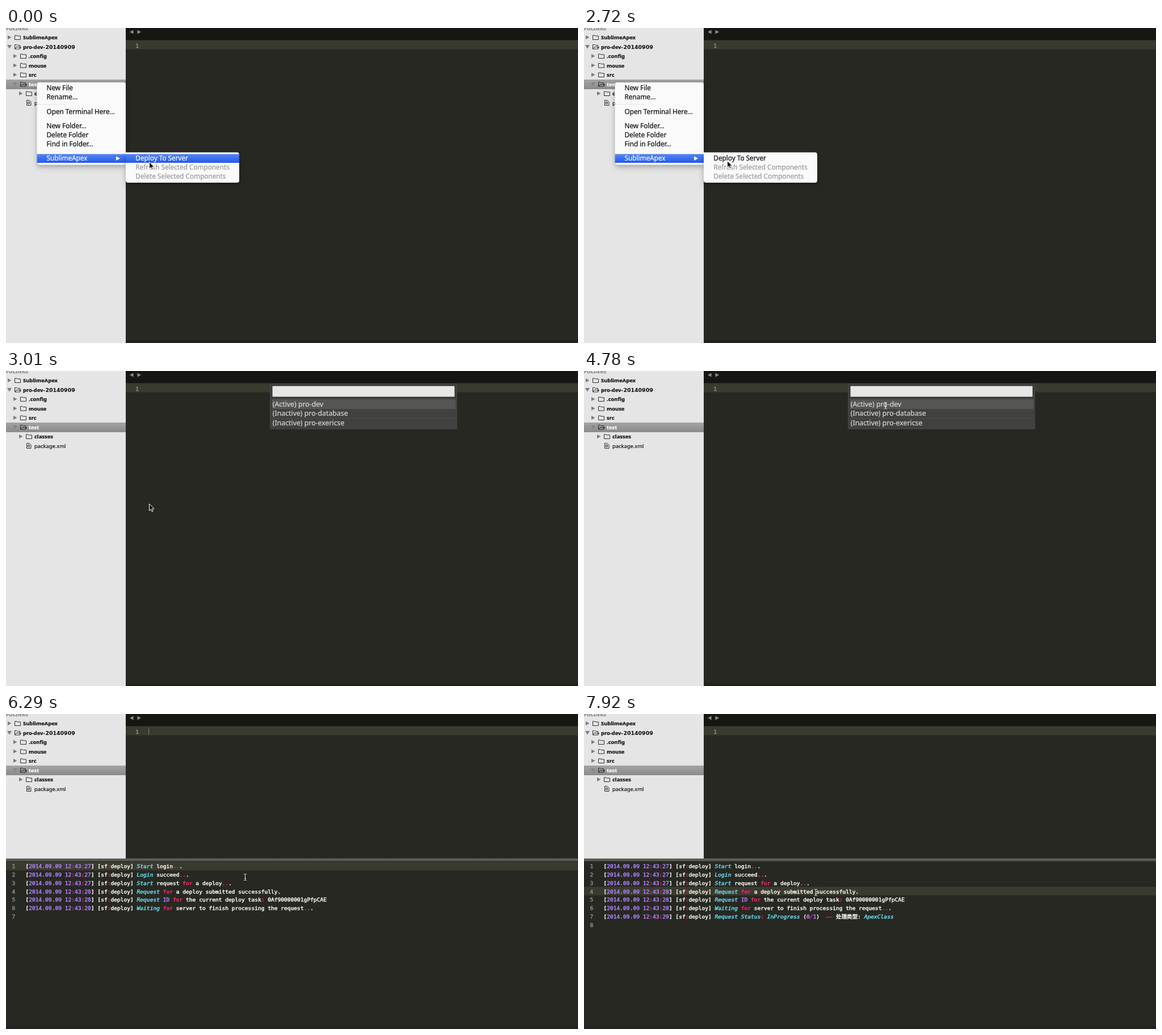
An HTML page with a canvas for the animation above (8000 ms loop, 1008 px wide and 556 px high).

```html
<!DOCTYPE html>
<html lang="en">
<head>
<meta charset="utf-8">
<title>Deploy to server</title>
<style>
  html, body { margin: 0; width: 100%; height: 100%; overflow: hidden; background: #272822; }
  canvas { display: block; }
</style>
</head>
<body>
<canvas id="stage" width="1008" height="556"></canvas>
<script>
const ctx = document.getElementById('stage').getContext('2d');
const LOOP = 8000;
const SANS = '"Noto Sans", "Open Sans", sans-serif';
const MONO = '9.58px "DejaVu Sans Mono", "Noto Sans CJK SC", "Noto Sans CJK", monospace';
const MONO_WEIGHT = 0.5;
const WHITE = '#f8f8f2', PINK = '#f92672', PURPLE = '#ae81ff', CYAN = '#66d9ef';
const ACTIVE_LINE = '#3b3a2f', GUTTER = '#8f908a';
const LINE_STEP = 14.87;

// Moments of the hard changes
const T = { flash: 2720, reflash: 2860, panel: 3010, console: 4920, submitted: 5990,
            status: 6880, click: 7180, caretOn: 7320, caretOff: 7920 };

// time, x, y of the pointer
const POINTER = [
  [0, 252, 236], [150, 251, 238], [310, 251, 234], [460, 252, 231], [620, 252, 234],
  [3310, 275, 220], [3455, 345, 178], [3600, 440, 116], [3745, 510, 72], [3890, 531, 58],
  [4330, 531.5, 61], [5220, 525, 76], [5380, 505, 116], [5540, 480, 166], [5690, 459, 211],
  [5990, 444, 242], [6140, 430, 270], [6290, 421, 288], [6430, 417, 296],
  [6580, 413, 304], [6730, 410, 310], [6880, 408, 315]
];
const IBEAM_FROM = 4330;

// time, opacity of the editor caret
const CARET = [[T.console, 1], [5220, 0.5], [5380, 0], [5690, 0.5], [5990, 1], [6290, 0.35],
               [6430, 0], [6730, 0.5], [6880, 1], [T.click, 0]];

const LOG = [
  [T.console, '27', 'Start login...'],
  [T.console, '27', 'Login succeed...'],
  [T.console, '27', 'Start request for a deploy...'],
  [T.submitted, '28', 'Request for a deploy submitted successfully.'],
  [T.submitted, '28', 'Request ID for the current deploy task: 0Af90000001gPfpCAE'],
  [T.submitted, '28', 'Waiting for server to finish processing the request...'],
  [T.status, '29', 'Request Status: InProgress (0/1)  —— 处理类型: ApexClass']
];
// groups: plain id, operator, number, type name, rest
const TOKENS = /(\b0A\w+)|(\bfor\b|\.\.(?=\.)|(?<!型):|\/|——)|(\bID\b|\d[\d.]*)|(\b[A-Z][A-Za-z]+)|([a-z]+|.)/g;

const at = (keys, t) => keys.filter(k => k[0] <= t).pop();

function rect(x, y, w, h, fill) {
  ctx.fillStyle = fill;
  ctx.fillRect(x, y, w, h);
}

// A thin outline gives the heavier strokes of desktop text rendering
function text(str, x, y, color, font, weight = 0.2) {
  ctx.font = font;
  ctx.fillStyle = ctx.strokeStyle = color;
  ctx.lineWidth = weight;
  ctx.lineJoin = 'round';
  ctx.fillText(str, x, y);
  ctx.strokeText(str, x, y);
}

function poly(points, fill) {
  ctx.beginPath();
  points.forEach(([x, y]) => ctx.lineTo(x, y));
  ctx.closePath();
  if (fill) {
    ctx.fillStyle = fill;
    ctx.fill();
  }
}

function shade(y, h, top, bottom) {
  const g = ctx.createLinearGradient(0, y, 0, y + h);
  g.addColorStop(0, top);
  g.addColorStop(1, bottom);
  return g;
}

function triangle(x, y, open, color) {
  poly(open ? [[x - 1, y - 3], [x + 7, y - 3], [x + 3, y + 3.5]]
            : [[x, y - 3.5], [x + 6.5, y], [x, y + 3.5]], color);
}

function icon(kind, x, y) {
  ctx.strokeStyle = '#2c2c2c';
  ctx.lineWidth = 1;
  if (kind === 'file') {
    poly([[x + 1.5, y - 4.5], [x + 6, y - 4.5], [x + 9, y - 1.5], [x + 9, y + 4.5], [x + 1.5, y + 4.5]]);
    ctx.stroke();
    ctx.strokeRect(x + 3.5, y - 1.5, 3, 3.5);
    return;
  }
  const right = kind === 'open' ? x + 9.5 : x + 10.5;
  poly([[x + 0.5, y - 3.5], [x + 4, y - 3.5], [x + 5, y - 2.5], [right, y - 2.5], [right, y + 4], [x + 0.5, y + 4]]);
  if (kind === 'open') {
    ctx.moveTo(x + 1, y + 4);
    ctx.lineTo(x + 3, y + 0.5);
    ctx.lineTo(x + 11.5, y + 0.5);
    ctx.lineTo(x + 9.5, y + 4);
  }
  ctx.stroke();
}

function sidebar(height) {
  rect(0, 0, 211, height, '#e5e5e5');
  const bold = `bold 9.4px ${SANS}`;
  text('FOLDERS', 0, 4, '#858585', `bold 8.8px ${SANS}`);
  rect(0, 91, 211, 17, shade(91, 17, '#a4a4a4', '#8a8a8a'));
  const rows = [[0, 'closed', 'SublimeApex'], [0, 'open', 'pro-dev-'], [1, 'closed', '.config'],
                [1, 'closed', 'mouse'], [1, 'closed', 'src'], [1, 'open', 'test'],
                [2, 'closed', 'classes'], [2, 'file', 'package.xml']];
  rows.forEach(([level, kind, name], i) => {
    const x = level * 10, y = 16.5 + i * 16.5, picked = name === 'test';
    if (kind !== 'file') triangle(x + 3, y, kind === 'open', picked ? '#858585' : '#7c7c7c');
    icon(kind, x + 15, y);
    text(name, x + 30, y + 3.5, picked ? '#fff' : '#111', kind === 'file' ? `9.4px ${SANS}` : bold);
  });
  text('20140909', 69.5, 36.5, '#111', 'bold 9.4px "DejaVu Sans", sans-serif', 0.05);
}

function editor(t) {
  rect(0, 0, 1008, 556, '#272822');
  rect(211, 0, 797, 21, '#161713');
  rect(211, 22, 797, 15.5, ACTIVE_LINE);
  poly([[218, 7], [224.5, 3.5], [224.5, 10.5]], '#8b8c87');
  poly([[238, 7], [231.5, 3.5], [231.5, 10.5]], '#8b8c87');
  text('1', 228.3, 34.5, GUTTER, MONO, MONO_WEIGHT);
  const caret = at(CARET, t);
  if (caret) rect(251, 25, 1, 12, `rgba(248,248,240,${caret[1]})`);
}

function logLine(str, x, y) {
  for (const [word, , op, num, type] of str.matchAll(TOKENS)) {
    const color = op ? PINK : num ? PURPLE : type ? CYAN : WHITE;
    text(word, x, y, color, (type ? 'italic ' : '') + MONO, MONO_WEIGHT);
    x += ctx.measureText(word).width;
  }
}

function consolePane(t) {
  const base = i => Math.round(272 + i * LINE_STEP);
  const lines = LOG.filter(l => l[0] <= t);
  const active = t < T.click ? 0 : 3;
  rect(0, 255, 1008, 301, '#272822');
  rect(0, 255, 1008, 5, shade(255, 5, '#666763', '#4c4d49'));
  rect(0, Math.floor(261 + active * LINE_STEP), 1008, 15, ACTIVE_LINE);
  for (let i = 0; i <= lines.length; i++) text(String(i + 1), 10.5, base(i), GUTTER, MONO, MONO_WEIGHT);
  lines.forEach(([, sec, msg], i) =>
    logLine(`[2014.09.09 12:43:${sec}] [sf:deploy] ${msg}`, 34.5, base(i)));
  if (t >= T.caretOn && t < T.caretOff) rect(408, 307, 1, 13, WHITE);
}

function sheet(x, y, w, h, radii) {
  ctx.save();
  ctx.shadowColor = 'rgba(0,0,0,0.28)';
  ctx.shadowBlur = 10;
  ctx.shadowOffsetY = 4;
  ctx.fillStyle = '#fafafa';
  ctx.beginPath();
  ctx.roundRect(x, y, w, h, radii);
  ctx.fill();
  ctx.restore();
}

function menus(t) {
  const font = `11.75px ${SANS}`;
  const bar = (x, w) => rect(x, 222.5, w, 15.5, shade(222.5, 15.5, '#5585f3', '#2459ee'));
  const lit = t < T.flash || t >= T.reflash;

  sheet(54.5, 96, 156.5, 145.5, [4, 4, 0, 5]);
  rect(55, 134, 50, 1, '#e4e4e4');
  bar(54.5, 156.5);
  const items = [['New File', 110.3], ['Rename…', 126], ['Open Terminal Here…', 151.7],
                 ['New Folder…', 177.3], ['Delete Folder', 193], ['Find in Folder…', 208.7]];
  items.forEach(([name, y]) => text(name, 71.5, y, '#0c0c0c', font));
  text('SublimeApex', 71.5, 234.3, '#fff', font);
  poly([[194, 226.5], [201, 230.2], [194, 234]], '#fff');

  sheet(211, 219.5, 200, 53.5, [0, 4, 4, 4]);
  if (lit) bar(211, 200);
  text('Deploy To Server', 228.3, 234.3, lit ? '#fff' : '#0c0c0c', font);
  text('Refresh Selected Components', 228.3, 250, '#999', font);
  text('Delete Selected Components', 228.3, 265.7, '#999', font);
}

function quickPanel() {
  const font = `12.3px ${SANS}`;
  rect(465, 22, 330, 81, '#414240');
  rect(468, 25, 324, 22, '#2e2f2d');
  rect(469.5, 26.5, 321, 19, '#e6e6e4');
  rect(469, 50, 323, 17, '#565755');
  rect(469, 83, 323, 1, '#4b4c4a');
  ['(Active) pro-dev', '(Inactive) pro-database', '(Inactive) pro-exericse']
    .forEach((s, i) => text(s, 469.8, 62.8 + i * 16.5, '#d9d9d6', font));
}

function arrow(x, y) {
  poly([[0, 0], [0, 12], [2.8, 9.4], [4.6, 13.6], [6.6, 12.8], [4.9, 8.7], [8.6, 8.5]]
    .map(([dx, dy]) => [x + 0.5 + dx, y + 0.5 + dy]), '#0a0a0a');
  ctx.strokeStyle = '#fff';
  ctx.lineWidth = 1;
  ctx.stroke();
}

function ibeam(x, y) {
  const cx = Math.floor(x) + 0.5;
  ctx.beginPath();
  for (const s of [-1, 1]) {
    ctx.moveTo(cx - 2.5, y + s * 6);
    ctx.lineTo(cx, y + s * 5);
    ctx.lineTo(cx + 2.5, y + s * 6);
  }
  ctx.moveTo(cx, y - 5);
  ctx.lineTo(cx, y + 5);
  ctx.moveTo(cx - 1.5, y + 2.5);
  ctx.lineTo(cx + 1.5, y + 2.5);
  ctx.strokeStyle = '#e2e2de';
  ctx.lineWidth = 1;
  ctx.stroke();
}

function draw(t) {
  const withConsole = t >= T.console;
  editor(t);
  sidebar(withConsole ? 255 : 556);
  if (withConsole) consolePane(t);
  else if (t >= T.panel) quickPanel();
  else menus(t);
  rect(withConsole ? 0 : 211, 551, 1008, 5, '#21221d');
  const [, x, y] = at(POINTER, t);
  (t < IBEAM_FROM ? arrow : ibeam)(x, y);
}

function tick() {
  draw(performance.now() % LOOP);
  requestAnimationFrame(tick);
}
tick();
</script>
</body>
</html>
```
